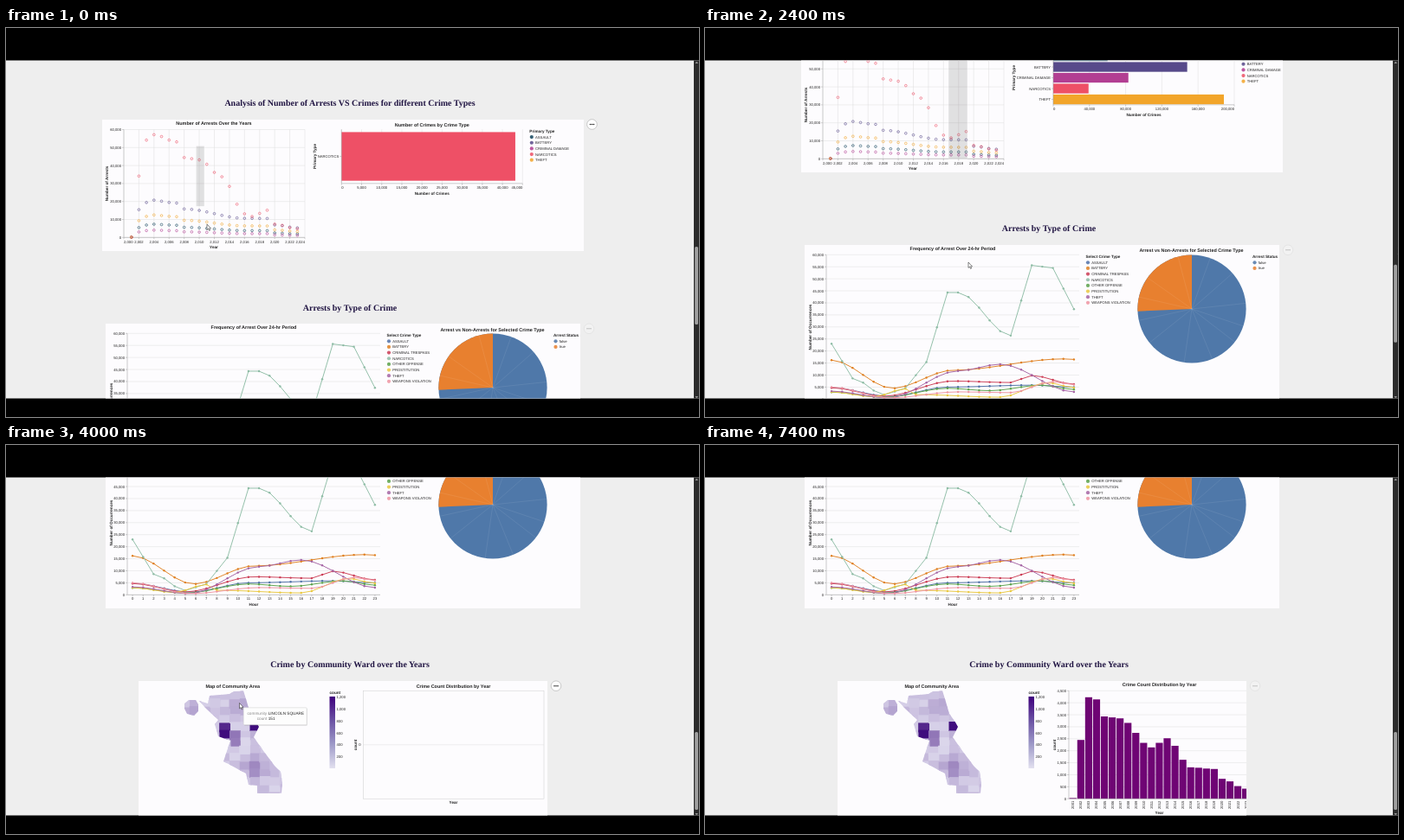
These frames come from a looping animation (800x450 px, 7.5 s). An HTML page:

```html
<!DOCTYPE html>
<html lang="en">
<head>
<meta charset="utf-8">
<title>Crime dashboard</title>
<style>
html, body { margin: 0; width: 100%; height: 100%; overflow: hidden; background: #000; }
svg { display: block; width: 800px; height: 450px; }
text { font-family: "Liberation Sans", Arial, sans-serif; text-rendering: geometricPrecision; }
.heading { font-family: "Liberation Serif", "Times New Roman", serif; font-weight: bold; }
</style>
</head>
<body>
<svg id="stage" viewBox="0 0 800 450"></svg>
<script>
const LOOP = 7500;
const LABEL = 4.2, AXIS_TITLE = 4.65, TITLE = 5.46, HEADING = 10;
const INK = '#222', PANEL = '#fdfcfe';

function el(parent, tag, attrs = {}) {
  const node = document.createElementNS('http://www.w3.org/2000/svg', tag);
  for (const key in attrs) node.setAttribute(key, attrs[key]);
  return parent.appendChild(node);
}
const group = (parent, dy = 0) => el(parent, 'g', { transform: `translate(0 ${dy})` });
const rect = (g, x, y, width, height, fill, more) => el(g, 'rect', { x, y, width, height, fill, ...more });
const line = (g, x1, y1, x2, y2, stroke = '#ddd', width = 0.5) =>
  el(g, 'line', { x1, y1, x2, y2, stroke, 'stroke-width': width });
const show = (node, on) => node.setAttribute('visibility', on ? 'visible' : 'hidden');
const comma = n => n.toLocaleString('en-US');
const smooth = u => u * u * (3 - 2 * u);
const noise = n => { const v = Math.sin(n * 91.7) * 43758.5; return v - Math.floor(v); };

// Eased interpolation over key rows of [position, ...values].
function sample(rows, p) {
  if (p <= rows[0][0]) return rows[0].slice(1);
  const i = rows.findIndex(row => p <= row[0]);
  if (i < 0) return rows[rows.length - 1].slice(1);
  const a = rows[i - 1], b = rows[i], u = smooth((p - a[0]) / (b[0] - a[0]));
  return a.slice(1).map((v, k) => v + (b[k + 1] - v) * u);
}

// Text centred vertically on y; turn rotates it a quarter left.
function text(g, x, y, str, { size = LABEL, anchor = 'start', bold, fill = INK, turn, cls } = {}) {
  const node = el(g, 'text', { x, y: y + size * 0.35, 'font-size': size, 'text-anchor': anchor, fill });
  if (bold) node.setAttribute('font-weight', 'bold');
  if (turn) node.setAttribute('transform', `rotate(-90 ${x} ${y})`);
  if (cls) node.setAttribute('class', cls);
  node.textContent = str;
  return node;
}
const title = (g, x, y, str) => text(g, x, y, str, { size: TITLE, bold: true, anchor: 'middle' });
const axisTitle = (g, x, y, str, turn) => text(g, x, y, str, { size: AXIS_TITLE, bold: true, anchor: 'middle', turn });
const heading = (g, y, str) => text(g, 397, y, str, { size: HEADING, anchor: 'middle', fill: '#201442', cls: 'heading' });

function axisY(g, left, right, top, bottom, max, step) {
  for (let v = 0; v <= max; v += step) {
    const y = bottom - (bottom - top) * v / max;
    line(g, left, y, right, y);
    line(g, left - 2, y, left, y, '#888', 0.4);
    text(g, left - 3, y, comma(v), { anchor: 'end' });
  }
  line(g, left, top, left, bottom, '#999');
}

function axisX(g, left, right, top, bottom, min, max, step) {
  for (let v = min; v <= max; v += step) {
    const x = left + (right - left) * (v - min) / (max - min);
    line(g, x, top, x, bottom);
    line(g, x, bottom, x, bottom + 2, '#888', 0.4);
    text(g, x, bottom + 5.2, comma(v), { anchor: v === min ? 'start' : v === max ? 'end' : 'middle' });
  }
  line(g, left, bottom, right, bottom, '#999');
}

function legend(g, x, y, name, items) {
  text(g, x, y, name, { size: AXIS_TITLE, bold: true });
  items.forEach(([label, color], i) => {
    const cy = y + 6.8 + i * 6.65;
    el(g, 'circle', { cx: x + 2.5, cy, r: 2.1, fill: color, opacity: 0.85 });
    text(g, x + 6.7, cy, label);
  });
}

function menuButton(g, cx, cy) {
  const b = el(g, 'g');
  el(b, 'circle', { cx, cy, r: 5.8, fill: '#fff', stroke: '#aaa', 'stroke-width': 0.6 });
  for (const dx of [-2, 0, 2]) el(b, 'circle', { cx: cx + dx, cy, r: 0.8, fill: '#222' });
  return b;
}

const svg = document.getElementById('stage');
const defs = el(svg, 'defs');
const clip = (id, ...box) => rect(el(defs, 'clipPath', { id }), ...box);
clip('view', 0, 37.5, 800, 391);
clip('panel', 153, 273, 472, 180);
rect(svg, 0, 0, 800, 450, '#000');
const view = el(svg, 'g', { 'clip-path': 'url(#view)' });
rect(view, 0, 37, 800, 393, '#eee');
const page = el(view, 'g');

// Arrests against crimes
const types = [
  ['ASSAULT', '#11455c'], ['BATTERY', '#574a8a'], ['CRIMINAL DAMAGE', '#b23e92'],
  ['NARCOTICS', '#ee5066'], ['THEFT', '#f2a52a']
];
const NARCOTICS = 3;
const first = group(page);
heading(first, 86.5, 'Analysis of Number of Arrests VS Crimes for different Crime Types');
rect(first, 111, 106, 556, 152, PANEL);
title(first, 240, 110.5, 'Number of Arrests Over the Years');
axisY(first, 136, 345, 117.5, 242.3, 60000, 10000);
axisX(first, 136, 345, 117.5, 242.3, 2000, 2024, 2);
axisTitle(first, 116.5, 180, 'Number of Arrests', true);
axisTitle(first, 240, 253.5, 'Year');

// Thousands per year since 2000; the other types follow battery at a fixed share.
const narcoticArrests = [[1, 0], [2, 34], [3, 54], [4, 57], [7, 53], [8, 44.3], [10, 43], [13, 33.6],
  [16, 13], [17, 11.5], [19, 15], [20, 7.3], [23, 4.6]];
const batteryArrests = [[1, 0], [2, 15.3], [3.5, 20.7], [7, 19], [8, 15.7], [16, 10.5], [19, 10.4], [20, 6.8], [23, 5.2]];
const shareOfBattery = [0.35, 1, 0.19, 0, 0.6];
types.forEach(([, stroke], i) => {
  for (let year = 1; year <= 23; year++) {
    const count = i === NARCOTICS ? sample(narcoticArrests, year)[0] : sample(batteryArrests, year)[0] * shareOfBattery[i];
    el(first, 'circle', {
      cx: 136 + year * 8.71, cy: 242 - count * 2.08, r: 1.35,
      fill: 'none', stroke, 'stroke-width': 0.85, opacity: 0.7
    });
  }
});
const brush = rect(first, 0, 0, 0, 0, '#333', { 'fill-opacity': 0.14, stroke: '#fff', 'stroke-width': 0.4 });

function crimesChart(left, max, step, rows) {
  const g = el(first, 'g'), right = left + 209, top = 117.3, bottom = 179.8;
  title(g, left + 104.5, 112, 'Number of Crimes by Crime Type');
  axisX(g, left, right, top, bottom, 0, max, step);
  axisTitle(g, left + 104.5, 191, 'Number of Crimes');
  axisTitle(g, 356.8, 148.5, 'Primary Type', true);
  const pitch = (bottom - top) / rows.length;
  rows.forEach(([kind, value], i) => {
    const y = top + pitch * (i + 0.5);
    rect(g, left, y - pitch * 0.45, 209 * value / max, pitch * 0.9, types[kind][1]);
    line(g, left - 2, y, left, y, '#888', 0.4);
    text(g, left - 3, y, types[kind][0], { anchor: 'end' });
  });
  line(g, left, top, left, bottom, '#999');
  legend(g, right + 8, 119.3, 'Primary Type', types);
  return g;
}
const narrowCrimes = crimesChart(387.3, 45000, 5000, [[NARCOTICS, 43200]]);
const wideCrimes = crimesChart(402, 200000, 40000, [60000, 148000, 83000, 39000, 188500].map((n, i) => [i, n]));
menuButton(first, 676.5, 111.5);

// Arrests by hour and outcome
const second = group(page, 252);
heading(second, 71, 'Arrests by Type of Crime');
rect(second, 115, 90, 548, 194, PANEL);
title(second, 286, 94.3, 'Frequency of Arrest Over 24-hr Period');
axisY(second, 140, 432, 101.3, 268.3, 60000, 5000);
line(second, 140, 268.3, 432, 268.3, '#999');
axisTitle(second, 121, 185, 'Number of Occurrences', true);
axisTitle(second, 286, 279.3, 'Hour');
const hourX = h => 140 + (h + 0.5) * 292 / 24;
for (let h = 0; h < 24; h++) {
  line(second, hourX(h), 268.3, hourX(h), 270.3, '#888', 0.4);
  text(second, hourX(h), 273, h, { anchor: 'middle' });
}

// Peaks and troughs as [hour, thousands].
const hourly = [
  ['ASSAULT', '#5273a9', [[0, 4.8], [5.5, 1.1], [11, 5], [19, 5.8], [23, 5]]],
  ['BATTERY', '#e08122', [[0, 16.2], [5.8, 4.5], [11.5, 12], [22, 16.7], [23, 16.5]]],
  ['CRIMINAL TRESPASS', '#cc3d55', [[0, 4.7], [5, 1.2], [11.5, 7.5], [17, 6.9], [19, 9.8], [23, 6.2]]],
  ['NARCOTICS', '#8fbda6', [[0, 23], [2, 8.6], [5, 1.8], [7, 4.5], [9, 15.4], [11, 44.3], [12, 44.3], [17, 26.4], [19, 55.6], [21, 54.5], [23, 37.4]]],
  ['OTHER OFFENSE', '#5ba24b', [[0, 2.9], [5, 0.7], [11, 4.5], [15, 3.5], [20, 5.8], [23, 4]]],
  ['PROSTITUTION', '#e9c840', [[0, 3], [4, 1], [7, 4.3], [8, 1.9], [16, 0.8], [20.5, 6.8], [23, 4.8]]],
  ['THEFT', '#a565a4', [[0, 3.3], [5.4, 0.5], [12, 11.7], [16, 14.5], [23, 3]]],
  ['WEAPONS VIOLATION', '#ef95a2', [[0, 5], [5.5, 0.5], [12, 3], [17, 2.7], [21, 7.2], [23, 6]]]
];
for (const [, color, rows] of hourly) {
  const points = Array.from({ length: 24 }, (_, h) => [hourX(h), 268.3 - sample(rows, h)[0] * 2.783]);
  el(second, 'polyline', { points: points.join(' '), fill: 'none', stroke: color, 'stroke-width': 0.95 });
  for (const [cx, cy] of points) el(second, 'circle', { cx, cy, r: 1.2, fill: color });
}
legend(second, 439.5, 103.5, 'Select Crime Type', hourly);

const BLUE = '#4f78a9', ORANGE = '#e8802f';
title(second, 561.5, 96.6, 'Arrest vs Non-Arrests for Selected Crime Type');
const pie = { cx: 562, cy: 164, r: 62.6 };
const rim = deg => {
  const a = deg * Math.PI / 180;
  return [pie.cx + pie.r * Math.sin(a), pie.cy - pie.r * Math.cos(a)];
};
el(second, 'circle', { ...pie, fill: BLUE });
el(second, 'path', {
  d: `M${pie.cx} ${pie.cy}L${rim(267.5)}A${pie.r} ${pie.r} 0 0 1 ${rim(360)}Z`, fill: ORANGE
});
for (let i = 0; i < 12; i++) {
  line(second, pie.cx, pie.cy, ...rim(30 * i + 28 * noise(i + 3)), '#fff', 0.4).setAttribute('opacity', 0.2);
}
legend(second, 632, 103.5, 'Arrest Status', [['false', BLUE], ['true', ORANGE]]);
const secondMenu = menuButton(second, 673, 95.8);

// Community map and yearly distribution
const third = group(page, 347);
heading(third, 253.5, 'Crime by Community Ward over the Years');
rect(third, 153, 273, 472, 180, PANEL);
title(third, 261.7, 279.3, 'Map of Community Area');

el(el(defs, 'clipPath', { id: 'city' }), 'path', {
  d: 'M206 299l5-4h8l3 5v8l-5 5-8-2-3-6ZM223 296l10 3 2-9 23-2 5-3 11-1 4 13 4 14 6 8 4 7-6 12 ' +
     '12 17 12 16 7 7 2 13-1 12-28 0 0-9-10-1-3-13-26-14 8-24-14-5-4-14 4-5-14-13Z'
});
const map = el(third, 'g', { 'clip-path': 'url(#city)' });
const hotspots = [
  { x: 252, y: 329, heat: 0.95, size: 7.5 }, { x: 286, y: 325, heat: 0.9, size: 7 },
  { x: 264, y: 336, heat: 0.45, size: 8 }, { x: 287, y: 371, heat: 0.25, size: 14 },
  { x: 268, y: 303, heat: 0.15, size: 12 }, { x: 214, y: 303, heat: 0.12, size: 12 }
];
const CELL_W = 11.5, CELL_H = 9;
for (let x = 200; x < 320; x += CELL_W) {
  for (let y = 284; y < 412; y += CELL_H) {
    const seed = x * 3 + y;
    const heat = hotspots.reduce((sum, s) => {
      const d = Math.hypot(x + CELL_W / 2 - s.x, y + CELL_H / 2 - s.y) / s.size;
      return sum + s.heat * Math.exp(-(d ** 4));
    }, 0.04 + 0.14 * noise(seed));
    const channel = (light, dark) => light + (dark - light) * Math.min(1, heat);
    rect(map, x + 2 * noise(seed + 1), y + 2 * noise(seed + 2), CELL_W + 2, CELL_H + 2,
      `rgb(${channel(226, 63)} ${channel(223, 12)} ${channel(240, 125)})`);
  }
}

text(third, 373.5, 286.3, 'count', { size: AXIS_TITLE, bold: true });
const ramp = el(defs, 'linearGradient', { id: 'ramp', x1: 0, y1: 0, x2: 0, y2: 1 });
['#3f007d', '#6a51a3', '#9e9ac8', '#e2e0ef']
  .forEach((color, i) => el(ramp, 'stop', { offset: i / 3, 'stop-color': color }));
rect(third, 373.5, 291, 6.5, 83, 'url(#ramp)');
for (let v = 200; v <= 1200; v += 200) text(third, 381.5, 374.4 - v * 0.0687, comma(v));
axisTitle(third, 403.8, 347, 'count', true);

const emptyPlot = el(third, 'g');
title(emptyPlot, 516.5, 279.3, 'Crime Count Distribution by Year');
rect(emptyPlot, 412.3, 284.2, 208.7, 125, 'none', { stroke: '#ccc', 'stroke-width': 0.5 });
line(emptyPlot, 412, 346.8, 621, 346.8);
text(emptyPlot, 409.5, 346.8, '0', { anchor: 'end' });
axisTitle(emptyPlot, 516.5, 413.4, 'Year');

const yearPlot = el(third, 'g', { 'clip-path': 'url(#panel)' });
title(yearPlot, 524.5, 277.2, 'Crime Count Distribution by Year');
axisY(yearPlot, 420, 629, 284.3, 409.2, 4500, 500);
axisTitle(yearPlot, 524.5, 425.6, 'Year');
const yearly = [[2001, 30], [2002, 2450], [2003, 4230], [2004, 4140], [2005, 3430], [2007, 3350],
  [2011, 2140], [2013, 2520], [2016, 1310], [2019, 1240], [2020, 830], [2023, 420]];
for (let year = 2001; year <= 2023; year++) {
  const x = 424.8 + (year - 2001) * 9.06, h = sample(yearly, year)[0] * 124.9 / 4500;
  rect(yearPlot, x - 4.1, 409.2 - h, 8.2, h, '#6f0574');
  text(yearPlot, x, 416.3, year, { anchor: 'middle', turn: true });
}
line(yearPlot, 420, 409.2, 629, 409.2, '#999');
const thirdMenu = menuButton(third, 635, 278.7);

// Overlays
const tooltip = el(view, 'g');
rect(tooltip, 0.7, 1, 73, 20, '#000', { opacity: 0.12, rx: 1 });
rect(tooltip, 0, 0, 73, 20, '#fdfdfd', { stroke: '#ccc', 'stroke-width': 0.5, rx: 1 });
['community', 'count'].forEach((key, i) => text(tooltip, 27, 6.4 + i * 6.6, key, { size: 4.7, anchor: 'end', fill: '#888' }));
const place = text(tooltip, 28.5, 6.4, '', { size: 4.7 });
const amount = text(tooltip, 28.5, 13, '', { size: 4.7 });

rect(view, 794, 37, 6, 393, '#2b2b2b');
el(view, 'path', { d: 'M795.5 41l1.8-2.2 1.8 2.2Z M795.5 426l1.8 2.2 1.8-2.2Z', fill: '#999' });
const thumb = rect(view, 795.2, 0, 3.8, 90, '#a0a0a0', { rx: 1.5 });
const pointer = el(view, 'path', {
  d: 'M0 0V6.4L1.5 5.1 2.6 7.5 3.6 7 2.6 4.8H4.5Z', fill: '#fff', stroke: '#333', 'stroke-width': 0.6
});

const DRAG_START = 1050, DRAG_END = 1500, CLICK = 4600, EXIT = 7100;
const scrolls = [[300, 0], [700, 30], [2050, 30], [2400, 91], [2900, 252], [3250, 252], [3700, 347]];
const pointerPath = [[0, 232, 227], [DRAG_START, 281, 95], [DRAG_END, 303, 213], [1750, 304, 266],
  [2300, 304, 271], [3400, 304, 271], [4000, 269.5, 298.5], [CLICK, 262, 334], [5000, 262, 334],
  [6200, 533, 405], [6600, 533, 405], [EXIT, 40, 330]];

function drawBrush(t) {
  const fresh = t >= DRAG_START;
  const u = smooth(Math.min(1, (t - DRAG_START) / (DRAG_END - DRAG_START)));
  const [x, y, width, height] = fresh ? [281, 125, 22 * u, 117.3 * u] : [219.3, 136.3, 9.7, 70];
  for (const [key, value] of Object.entries({ x, y, width, height })) brush.setAttribute(key, value);
  const all = fresh && height > 113;
  show(narrowCrimes, !all);
  show(wideCrimes, all);
}

function render(t) {
  const [scroll] = sample(scrolls, t);
  const [px, py] = sample(pointerPath, t);
  page.setAttribute('transform', `translate(0 ${-scroll})`);
  thumb.setAttribute('y', 253 + scroll * 0.2277);
  drawBrush(t);

  show(emptyPlot, t < CLICK);
  show(yearPlot, t >= CLICK);
  secondMenu.setAttribute('opacity', t > 2500 ? 1 : 0.25);
  thirdMenu.setAttribute('opacity', t > 3700 && t < 5500 ? 1 : 0.25);

  pointer.setAttribute('transform', `translate(${px} ${py})`);
  show(pointer, t < EXIT);
  const north = t < 4250;
  place.textContent = north ? 'LINCOLN SQUARE' : 'NEAR WEST SIDE';
  amount.textContent = north ? '151' : '812';
  tooltip.setAttribute('transform', `translate(${px + 4.7} ${py + 5.3})`);
  show(tooltip, t >= 3850 && t < 5150);
}

const start = performance.now();
function tick() {
  render((performance.now() - start) % LOOP);
  requestAnimationFrame(tick);
}
tick();
</script>
</body>
</html>
```
